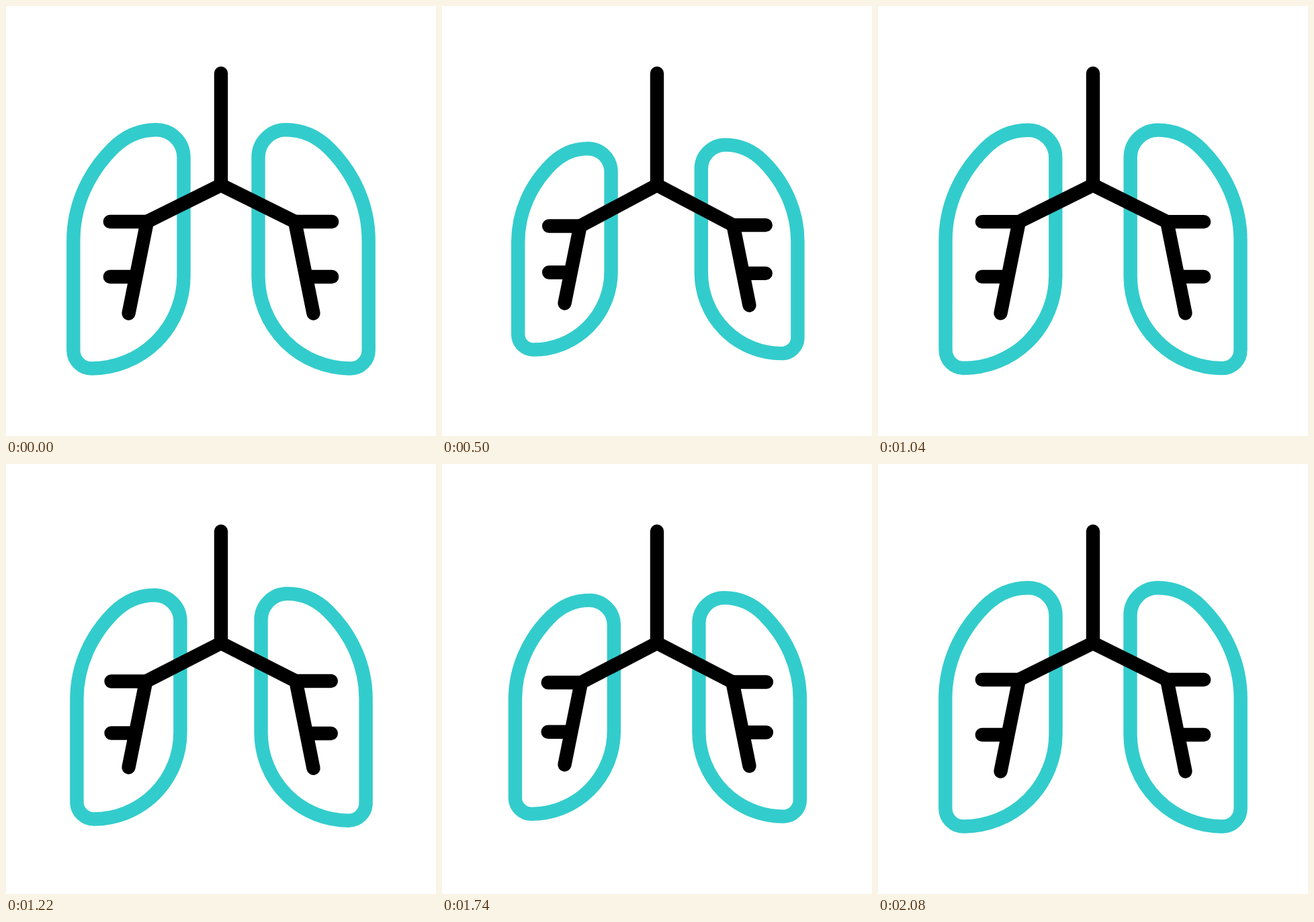
These frames come from a looping animation (640 px wide and 640 px high, 2.4 s). An HTML page:

```html
<!DOCTYPE html>
<html lang="en">
<head>
<meta charset="utf-8">
<title>Breathing lungs</title>
<style>
  @property --squeeze {
    syntax: "<number>";
    inherits: true;
    initial-value: 0;
  }

  html, body {
    margin: 0;
    width: 100%;
    height: 100%;
    overflow: hidden;
    background: #fff;
  }

  svg {
    display: block;
    width: 100vw;
    height: 100vh;
    fill: none;
    stroke-width: 20.4;
    stroke-linecap: round;
    stroke-linejoin: round;
    animation: breathe 2400ms cubic-bezier(.3333, 0, .6667, 1) infinite;
  }

  /* Each side shrinks about its own centre while the line weight stays. */
  .left, .right {
    vector-effect: non-scaling-stroke;
    transform: scale(calc(1 - var(--depth) * var(--squeeze)));
  }
  .left { --depth: .16; transform-origin: 182.5px 362px; }
  .right { --depth: .128; transform-origin: 457.5px 362px; }

  .lung { stroke: #3cc; }
  .airway { stroke: #000; }

  .fork {
    d: path("M210 321 L320 266.5 L430 321");
    animation: spread 2400ms cubic-bezier(.3333, 0, .6667, 1) infinite;
  }

  /* Two breaths, then a rest. */
  @keyframes breathe {
    0%, 41.667%, 86.667%, 100% { --squeeze: 0; }
    19.167%, 63.333% { --squeeze: 1; }
  }
  @keyframes spread {
    0%, 41.667%, 86.667%, 100% { d: path("M210 321 L320 266.5 L430 321"); }
    19.167%, 63.333% { d: path("M205.6 327.56 L320 266.5 L433.52 326.25"); }
  }
</style>
</head>
<body>
<svg viewBox="0 0 640 640">
  <g class="lung">
    <path class="left" d="M100.3 349 V512.5 A27 27 0 0 0 127.3 539.5 A137.2 137.5 0 0 0 264.5 402 V225.2 A41 41 0 0 0 223.5 184.2 C198.3 184.2 176.5 194.5 159 212 C122.2 248.8 100.3 297 100.3 349 Z"/>
    <path class="right" d="M539.7 349 V512.5 A27 27 0 0 1 512.7 539.5 A137.2 137.5 0 0 1 375.5 402 V225.2 A41 41 0 0 1 416.5 184.2 C441.7 184.2 463.5 194.5 481 212 C517.8 248.8 539.7 297 539.7 349 Z"/>
  </g>
  <g class="airway">
    <path d="M320 100.3 V266.5"/>
    <path class="fork" d="M210 321 L320 266.5 L430 321"/>
    <path class="left" d="M154.8 321 H210 L182.5 457.5 M154.8 403 H193.5"/>
    <path class="right" d="M485.2 321 H430 L457.5 457.5 M485.2 403 H446.5"/>
  </g>
</svg>
</body>
</html>
```
